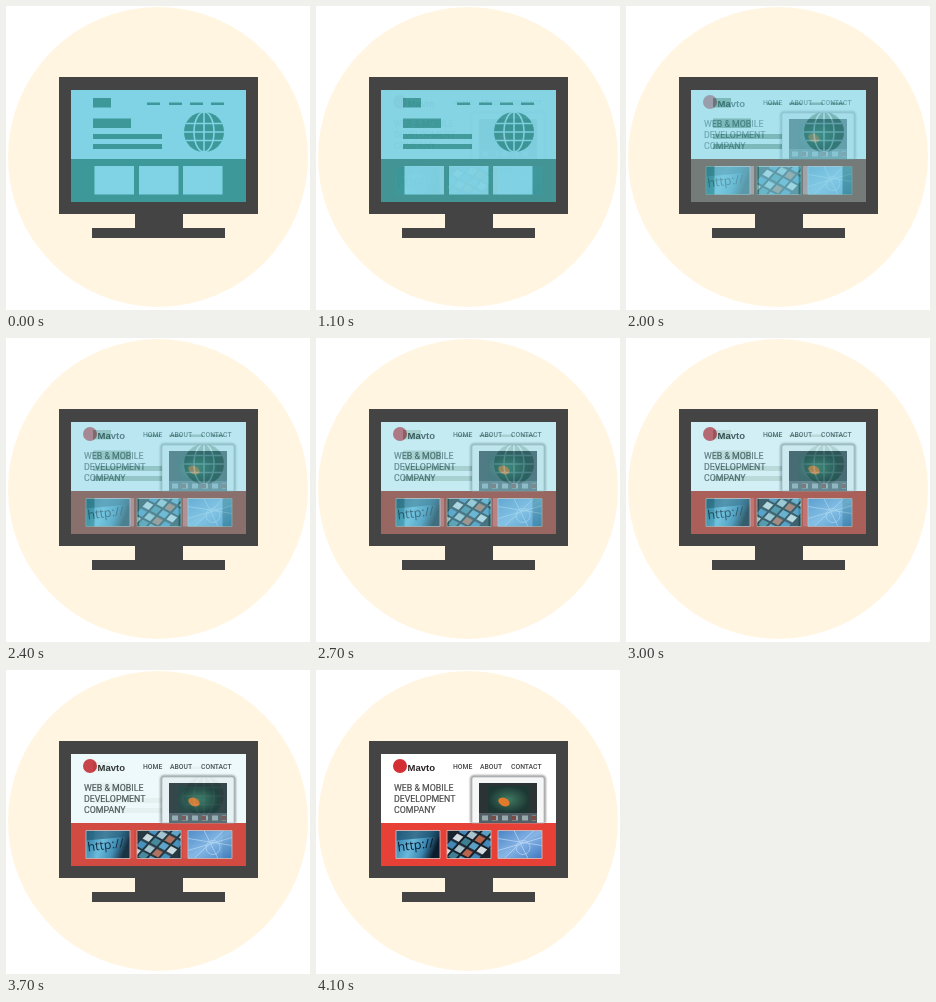
These frames come from a looping animation (304x304 px, 4.2 s). An HTML page:

```html
<!DOCTYPE html>
<html lang="en">
<head>
<meta charset="utf-8">
<title>Website on a monitor</title>
<style>
  html, body { margin: 0; width: 100%; height: 100%; overflow: hidden; background: #fff; }
  svg { display: block; width: 100%; height: 100%; }
  text { font-family: Roboto, Arial, sans-serif; }
  .menu { font-size: 6.8px; font-weight: 500; fill: #444; }
  .headline { font-size: 8.8px; fill: #484848; stroke: #484848; stroke-width: .15px; }
  .brand { font: 700 9.5px Arimo, "Liberation Sans", Arial, sans-serif; fill: #2b2323; }
  .link { font: 12.5px "Open Sans", sans-serif; fill: #07182c; }

  /* The finished page fades in over the wireframe in 31 even steps. */
  .site { opacity: 0; animation: reveal 4200ms infinite; }
  @keyframes reveal {
    0% { opacity: 0; }
    26.19% { opacity: 0; animation-timing-function: steps(31, jump-start); }
    100% { opacity: 1; }
  }
</style>
</head>
<body>
<svg viewBox="0 0 304 304">
  <defs>
    <linearGradient id="web" x2="1" y2=".25">
      <stop offset="0" stop-color="#2a78a8"/>
      <stop offset=".45" stop-color="#69b9dc"/>
      <stop offset=".75" stop-color="#3a86b0"/>
      <stop offset="1" stop-color="#0b1c2c"/>
    </linearGradient>
    <linearGradient id="sky" x2="1" y2="1">
      <stop offset="0" stop-color="#4a83c4"/>
      <stop offset=".5" stop-color="#86b4e6"/>
      <stop offset="1" stop-color="#3f78c0"/>
    </linearGradient>
    <radialGradient id="pond">
      <stop offset="0" stop-color="#3f7a62"/>
      <stop offset="1" stop-color="#1d3733"/>
    </radialGradient>
    <pattern id="apps" width="27" height="18" patternUnits="userSpaceOnUse"
             patternTransform="translate(133 158) rotate(28) skewX(-14)">
      <g stroke="#17202a" stroke-width="2">
        <rect width="9" height="9" fill="#5b9fc4"/>
        <rect x="9" width="9" height="9" fill="#d5dde0"/>
        <rect x="18" width="9" height="9" fill="#3f7f93"/>
        <rect y="9" width="9" height="9" fill="#b9654c"/>
        <rect x="9" y="9" width="9" height="9" fill="#4287b8"/>
        <rect x="18" y="9" width="9" height="9" fill="#a9c4cc"/>
      </g>
    </pattern>
    <clipPath id="thumb"><rect width="44" height="28"/></clipPath>
    <filter id="shade" x="-10%" y="-10%" width="120%" height="120%">
      <feGaussianBlur stdDeviation="1"/>
    </filter>
  </defs>

  <circle cx="152" cy="151" r="150" fill="#fff5e1"/>
  <path d="M53 71H252V208H177V222H219V232H86V222H129V208H53Z" fill="#444"/>

  <g class="wireframe">
    <path d="M65 84H240V196H65Z" fill="#80d3e4"/>
    <g fill="#3d9899">
      <path d="M65 153H240V196H65Z"/>
      <path d="M87 92h18v9.5h-18zM87 112.5h38v9.5h-38zM87 128h69v5h-69zM87 138h69v5h-69z"/>
      <path d="M141 96.5h13v2.5h-13zM163 96.5h13v2.5h-13zM184 96.5h13v2.5h-13zM205 96.5h13v2.5h-13z"/>
      <circle cx="198" cy="126" r="20"/>
    </g>
    <g fill="none" stroke="#80d3e4" stroke-width="1.6">
      <path d="M198 106V146M178 126H218M180 117.5H216M180 134.5H216"/>
      <ellipse cx="198" cy="126" rx="10" ry="20"/>
    </g>
    <path d="M88.500 160h39.500v28.500h-39.500zM133 160h39.500v28.500H133zM177 160h39.500v28.500H177z" fill="#80d3e4"/>
  </g>

  <g class="site">
    <path d="M65 84H240V196H65Z" fill="#fff"/>
    <path d="M65 153H240V196H65Z" fill="#e74036"/>

    <circle cx="84" cy="96" r="7" fill="#d32f35"/>
    <text class="brand" x="91.500" y="101">Mavto</text>

    <g class="menu">
      <text x="137" y="99.200">HOME</text>
      <text x="164" y="99.200">ABOUT</text>
      <text x="195" y="99.200">CONTACT</text>
    </g>
    <g class="headline">
      <text x="78" y="121.200">WEB &amp; MOBILE</text>
      <text x="78" y="132.200">DEVELOPMENT</text>
      <text x="78" y="143.200">COMPANY</text>
    </g>

    <g class="tablet">
      <path d="M155.500 153V109q0-2.500 2.500-2.500H226q2.500 0 2.500 2.500V153" fill="none" stroke="#777" stroke-width="2" filter="url(#shade)"/>
      <path d="M156 153V109q0-2 2-2H226q2 0 2 2V153Z" fill="#f5f6f6" stroke="#aeb1b2" stroke-width=".7"/>
      <path d="M163 113H221V153H163Z" fill="#2b3335"/>
      <path d="M172 116H213V143H172Z" fill="url(#pond)"/>
      <path d="M163 143H221V153H163Z" fill="#555e64"/>
      <path d="M166 148H220" stroke="#98a9ae" stroke-width="5" stroke-dasharray="6 4"/>
      <path d="M176 148H220" stroke="#7b4b44" stroke-width="4" stroke-dasharray="4 16"/>
      <ellipse cx="188" cy="132" rx="6" ry="4" fill="#e27a2c" transform="rotate(25 188 132)"/>
    </g>

    <g transform="translate(80 160.500)">
      <g clip-path="url(#thumb)">
        <path d="M0 0H44V28H0Z" fill="url(#web)"/>
        <path d="M0 0H44V6L0 10Z" fill="#153c58" opacity=".55"/>
        <text class="link" x="2" y="21" transform="rotate(-7 2 21)">http://</text>
      </g>
    </g>
    <path d="M131 160.500h44v28h-44z" fill="url(#apps)"/>
    <path d="M131 160.500h13l-13 11zM175 188.500h-12l12-10z" fill="#1a242d"/>
    <g transform="translate(182 160.500)" clip-path="url(#thumb)">
      <path d="M0 0H44V28H0Z" fill="url(#sky)"/>
      <g fill="none" stroke="#d0e4fa" stroke-width=".8" opacity=".75">
        <path d="M0 8L44 15M0 20L44 7M16 0L30 28M6 28L36 0"/>
        <circle cx="25" cy="17" r="7"/>
      </g>
    </g>
    <path d="M80 160.500h44v28H80zM131 160.500h44v28h-44zM182 160.500h44v28h-44z" fill="none" stroke="#d9c4c2" stroke-width=".8"/>
  </g>
</svg>
</body>
</html>
```
